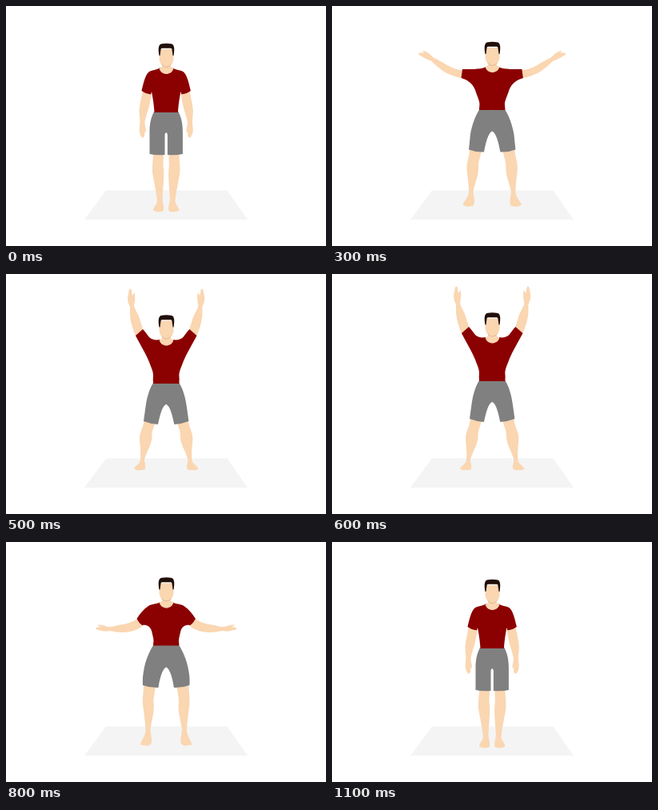
Write an HTML page with a canvas that moves like this. It is 400 by 300 pixels and loops after 1200 ms.

```html
<!DOCTYPE html>
<html lang="en">
<head>
<meta charset="utf-8">
<title>Jumping jack</title>
<style>
html, body { margin: 0; width: 100%; height: 100%; overflow: hidden; background: #fff; }
canvas { display: block; width: 400px; height: 300px; }
</style>
</head>
<body>
<canvas id="stage" width="400" height="300"></canvas>
<script>
const SKIN = '#fad6b1', JAW = '#d3ab80', HAIR = '#210f0a', SHIRT = '#8b0000', SHORTS = '#808080', MAT = '#f4f4f4';
const AXIS = 200.2;
const ctx = document.getElementById('stage').getContext('2d');

// Each pose holds the left half of the body; the right half is mirrored.
const stand = {
  head: 0,
  arm: 'M171 104C170 114 167 121 166.500 132C167 140 168 145 167 150C166 156 167 161 170 164.500C173 165 174 161 173 157L175 158C175.500 153 173 149 173.500 145C175 136 181 124 181.500 108Z',
  leg: 'M184 183C184 192 182.500 199 183 208C185 220 188 233 189 244C188 249 184 252 184 255.500C188 258 194 258 197 256C198 251 196 247 195.500 242C196 228 198 214 197 204C196 197 197 192 197 183Z',
  shorts: 'M185 132C181 140 179.500 147 179.500 158V185Q188 187 198.500 186V162Q198.500 158 201 158V132Z',
  shirt: 'M192 77.500C188 80 183 80 179 82C174 86 172 96 169.500 106Q174 109.500 181 110.500L182 107C184 117 185 125 185.500 133H201V77.500Z'
};
const dip = {
  head: 3.500,
  arm: 'M170 105C168 115 162 122 160 132C159 139 157.500 144 156.500 149C154.500 155 156 161 158.500 164.500C161 165 162 161 161.500 157L164 159C164.500 154 162 150 162.500 146C168 138 178 126 181 109Z',
  leg: 'M178 185C178 194 179 202 181 211C184 221 187 233 188.500 244C188 249 184.500 252 185 256C188 258.500 194 258.500 197.500 257C198.500 252 196 247 195 242C196 229 195 217 193.500 207C192 199 194 193 194 185Z',
  shorts: 'M184 135C178.500 143 176 153 176 164V187Q185 189 196 188L197 167Q197 162.500 201 162.500V135Z',
  shirt: 'M192 81C188 83.500 182 83 177 86C172 91 171 99 168.500 108Q174 110.500 180.500 111.500L181.500 108C184 120 184 127 183.500 136H201V81Z'
};
const wide = {
  head: -2.500,
  arm: 'M168 94C161 98 154 102 146 103C139 104 133 106.500 127 106C122 104 117 103 114 104L119 106.500C115 106 112 107 112 109C118 111 125 112.500 130 111C138 113 146 113.500 153 112.500C162 111 168 108 174 102Z',
  leg: 'M172 178C172 188 170.500 194 171 203C172.500 214 174 225 174.500 236C174 243 169 248 168 253C170 255 173 253.500 174.500 254.500C177 255.500 180 254 181.500 252C183 246 181 242 180.500 235C182 222 186 211 184.500 201C184 195 186 189 187 179Z',
  shorts: 'M184.500 128.500C179 137 174 149 172.500 159C171 166 170.500 173 171 179Q180 182.500 190.500 182C192 172 195 158 201 156V128.500Z',
  shirt: 'M192 75.500C188 78 182 77 178 80C172 84 167 90 163.500 96Q166 101 170 104C175 103 180 104.500 182 111C183 116 184.500 120 184.500 124Q184 127 184 129.500H201V75.500Z'
};
const rise = {
  head: -2,
  arm: 'M166 81C158 80 151 78 144 74C138 70 132 67 126 64C122 59 117 56 113 56L115 59C111 58 108 58.500 108 60.500C114 64 118 67 124 68.500C131 75 138 82 146 85C153 88 160 91 167 90Z',
  leg: 'M172 178C172 188 168 195 168.500 204C169.500 214 171 224 171 233C170 240 165 244 163.500 248.500C167 251.500 173 251 177 249.500C179 244 177 238 176.500 232C179 220 184 210 183 200C183 194 186 188 187 179Z',
  shorts: 'M184.500 129C179 137 175 149 173 160L171 179.500Q180 183 190 182.500C192 172 195 158 201 156V129Z',
  shirt: 'M192 76C188 79 182 78 178 79C173 79 168 79 163 79L161.500 90C169 92 176 97 179 105C181 112 184.500 118 184.500 123Q184 127 184 130H201V76Z'
};
const reach = {
  head: 1.500,
  arm: 'M163 77C159 67 156 59 155 49C155 45 155 41 155 38C152 33 151.500 27 153 22C153.500 18 154 15 156 15.500C157.500 17 157 21 158 24L160.500 20C162 25 161 32 160 37C162 43 166 48 168 56L172 69Z',
  leg: 'M173 180C173 190 166.500 197 167 207C168 216 168.500 226 168 233C167 238 161 240 160 243.500C163 246 169 245.500 173.500 244.500C175.500 241 173 236 173 232C176 221 183 212 182.500 202C182 196 186 190 187.500 181Z',
  shorts: 'M184 133C179 141 176 152 174.500 163L172 181Q181 184.500 190 185C192 176 195 161 201 159.500V133Z',
  shirt: 'M192 79C187 80 182 79 179 76C176 72 174 69 171 66L162 74C168 86 175 97 179 107C181 113 184.500 119 184 125C183.500 129 184 131 184 134H201V79Z'
};
const landed = { ...reach, drop: 3 };

const steps = [stand, dip, wide, rise, reach, landed, reach, rise, wide, dip, dip, stand];

function fill(path, color) {
  ctx.fillStyle = color;
  ctx.fill(new Path2D(path));
}

function drawHalf(pose) {
  fill(pose.leg, SKIN);
  ctx.translate(0, pose.drop || 0);
  fill(pose.arm, SKIN);
  fill(pose.shorts, SHORTS);
  fill(pose.shirt, SHIRT);
}

function drawHead(y) {
  ctx.translate(0, y);
  fill('M195 68V76Q194 77.500 191.500 78C193 83 197 85 200.500 85S208 83 209.500 78Q207 77.500 206 76V68Z', SKIN);
  fill('M191.500 54V66C192 72 196 76.500 200.500 76.500S209 72 209.500 66V54Z', SKIN);
  ctx.strokeStyle = JAW;
  ctx.lineWidth = 0.7;
  ctx.stroke(new Path2D('M194.500 73Q197 76.500 200.500 76.500T206.500 73'));
  fill('M191.500 62C190 54 190.500 49 193.500 47.500Q200.500 46 207.500 47.500C210.500 49 211 54 209.500 62H208.500L207.500 54.500Q207.500 53 206 52.700H195Q193.500 53 193.500 54.500L192.500 62Z', HAIR);
}

function draw(pose) {
  ctx.clearRect(0, 0, 400, 300);
  fill('M98 267L125 230.500H276.500L302 267Z', MAT);
  for (const side of [1, -1]) {
    ctx.save();
    if (side < 0) ctx.transform(-1, 0, 0, 1, 2 * AXIS, 0);
    drawHalf(pose);
    ctx.restore();
  }
  ctx.save();
  drawHead(pose.head + (pose.drop || 0));
  ctx.restore();
}

function tick() {
  draw(steps[Math.floor(performance.now() % 1200 / 100)]);
  requestAnimationFrame(tick);
}
tick();
</script>
</body>
</html>
```
